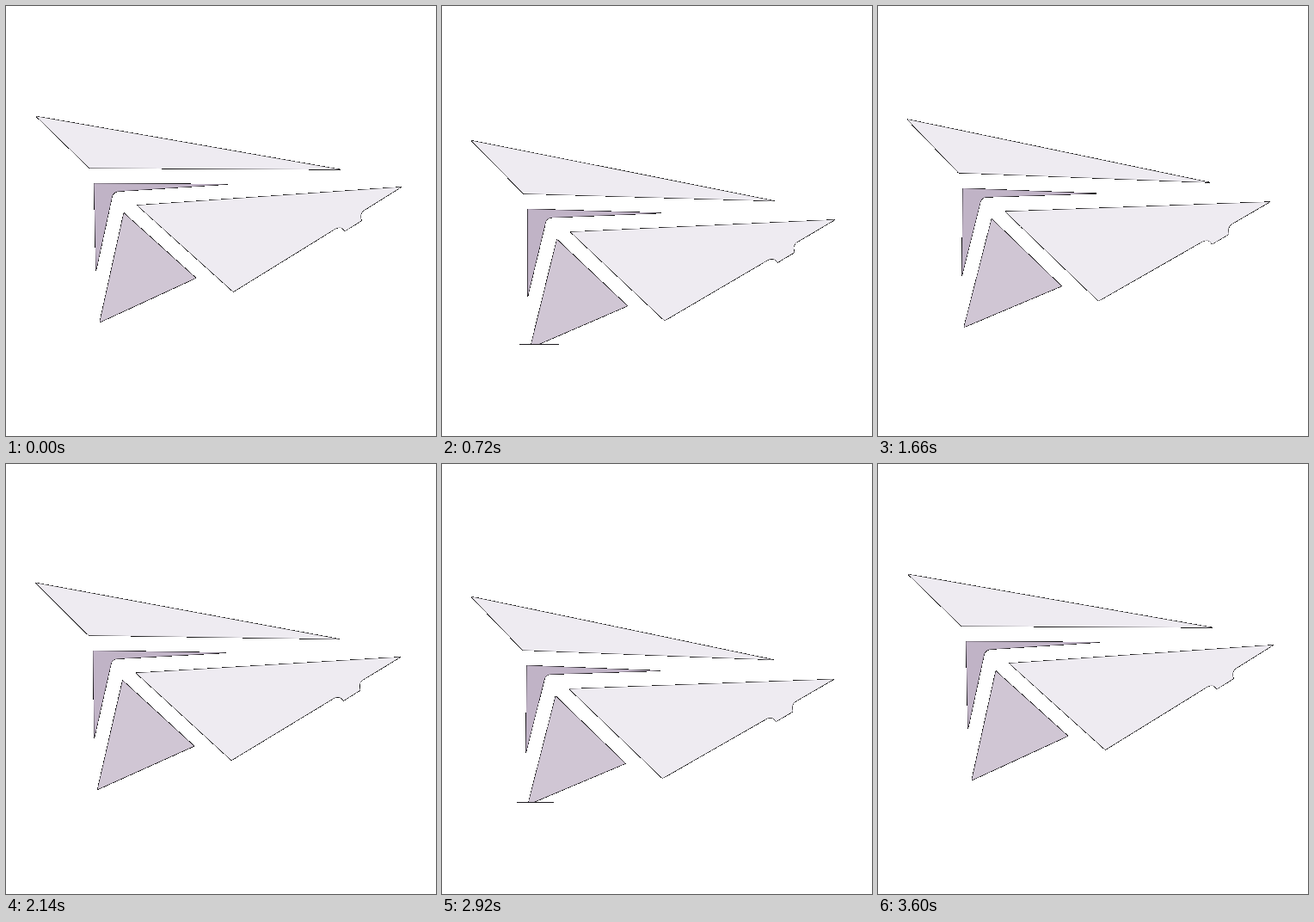
An HTML page with a canvas that plays this animation: 500x500 px, repeating every 3.62 s.

```html
<!DOCTYPE html>
<html lang="en">
<head>
<meta charset="utf-8">
<title>Paper plane</title>
<style>
html, body { margin: 0; width: 100%; height: 100%; overflow: hidden; background: #fff; }
canvas { display: block; width: 500px; height: 500px; }
</style>
</head>
<body>
<canvas id="stage" width="500" height="500"></canvas>
<script>
const ctx = document.getElementById('stage').getContext('2d', { willReadFrequently: true });
const SIZE = 500, LOOP = 3620, STEP = 20, FLOOR = 393;
const PIVOT = [-22, 95];
const INK = '#1c1a1e';

function curve(a, c, b, n = 8) {
  return Array.from({ length: n + 1 }, (_, i) => {
    const t = i / n, s = 1 - t;
    return [0, 1].map(k => s * s * a[k] + 2 * s * t * c[k] + t * t * b[k]);
  });
}

const shapes = [
  { fill: '#eeebf1', points: [[35, 128.3], [389, 190.28], [97, 188.6]] },
  { fill: '#c0b3c6', points: [
    [102.3, 206.3], [258, 207.3],
    ...curve([131, 215.6], [124, 216], [123, 223]),
    [104.6, 308]
  ] },
  { fill: '#d0c6d4', points: [[137, 240.8], [220.7, 316.3], [109, 367.7]] },
  { fill: '#eeebf1', points: [
    [152.6, 231.8], [459.5, 210.4],
    ...curve([417, 237], [410.5, 241], [413.3, 249.5]),
    ...curve([394, 261.8], [390, 255], [382, 259.5]),
    [264.3, 332.2]
  ] }
];

// White border below the plane; only its cut at the floor is visible.
const border = [
  [96.5, 355], [95.7, 364], [97, 368], [96.3, 380.3], [97, 382],
  [98.5, 382], [103.3, 380.1], [130, 368], [155, 356.6]
];

// Rises from 0 to 1 and back; skew makes the rise quicker than the fall.
function wave(t, period, skew) {
  const phase = 2 * Math.PI * t / period;
  return (1 - Math.cos(phase + skew * (1 - Math.cos(phase)))) / 2;
}

function poseAt(t) {
  const angle = 1.9 * wave(t, 1200, 0.3) * Math.PI / 180;
  const drop = 29 * wave(t, 1800, 0.05);
  const cos = Math.cos(angle), sin = Math.sin(angle);
  return ([x, y]) => {
    const dx = x - PIVOT[0], dy = y - PIVOT[1];
    return [PIVOT[0] + dx * cos - dy * sin, PIVOT[1] + dx * sin + dy * cos + drop];
  };
}

function drawShape({ fill, points }, pose) {
  ctx.beginPath();
  points.map(pose).forEach(p => ctx.lineTo(...p));
  ctx.closePath();
  ctx.fillStyle = fill;
  ctx.fill();
}

// Blends soft edge pixels with black, which gives the thin broken outline.
function darkenEdges() {
  const image = ctx.getImageData(0, 0, SIZE, SIZE), px = image.data;
  for (let i = 0; i < px.length; i += 4) {
    const alpha = px[i + 3] / 255;
    if (alpha === 0 || alpha === 1) continue;
    for (let k = 0; k < 3; k++) px[i + k] *= alpha;
    px[i + 3] = 255;
  }
  ctx.putImageData(image, 0, 0);
}

function drawFloorCut(pose) {
  const placed = border.map(pose), hits = [];
  for (let i = 1; i < placed.length; i++) {
    const [a, b] = [placed[i - 1], placed[i]];
    if ((a[1] < FLOOR) !== (b[1] < FLOOR)) {
      hits.push(a[0] + (b[0] - a[0]) * (FLOOR - a[1]) / (b[1] - a[1]));
    }
  }
  if (hits.length < 2) return;
  const left = Math.round(Math.min(...hits)), right = Math.round(Math.max(...hits));
  ctx.fillStyle = INK;
  ctx.fillRect(left, FLOOR, right - left, 1);
}

function draw(elapsed) {
  const t = Math.floor((elapsed % LOOP) / STEP) * STEP;
  const pose = poseAt(t);
  ctx.clearRect(0, 0, SIZE, SIZE);
  shapes.forEach(shape => drawShape(shape, pose));
  ctx.clearRect(0, FLOOR, SIZE, SIZE - FLOOR);
  darkenEdges();
  drawFloorCut(pose);
}

let start;
function tick(now) {
  start ??= now;
  draw(now - start);
  requestAnimationFrame(tick);
}
draw(0);
requestAnimationFrame(tick);
</script>
</body>
</html>
```
